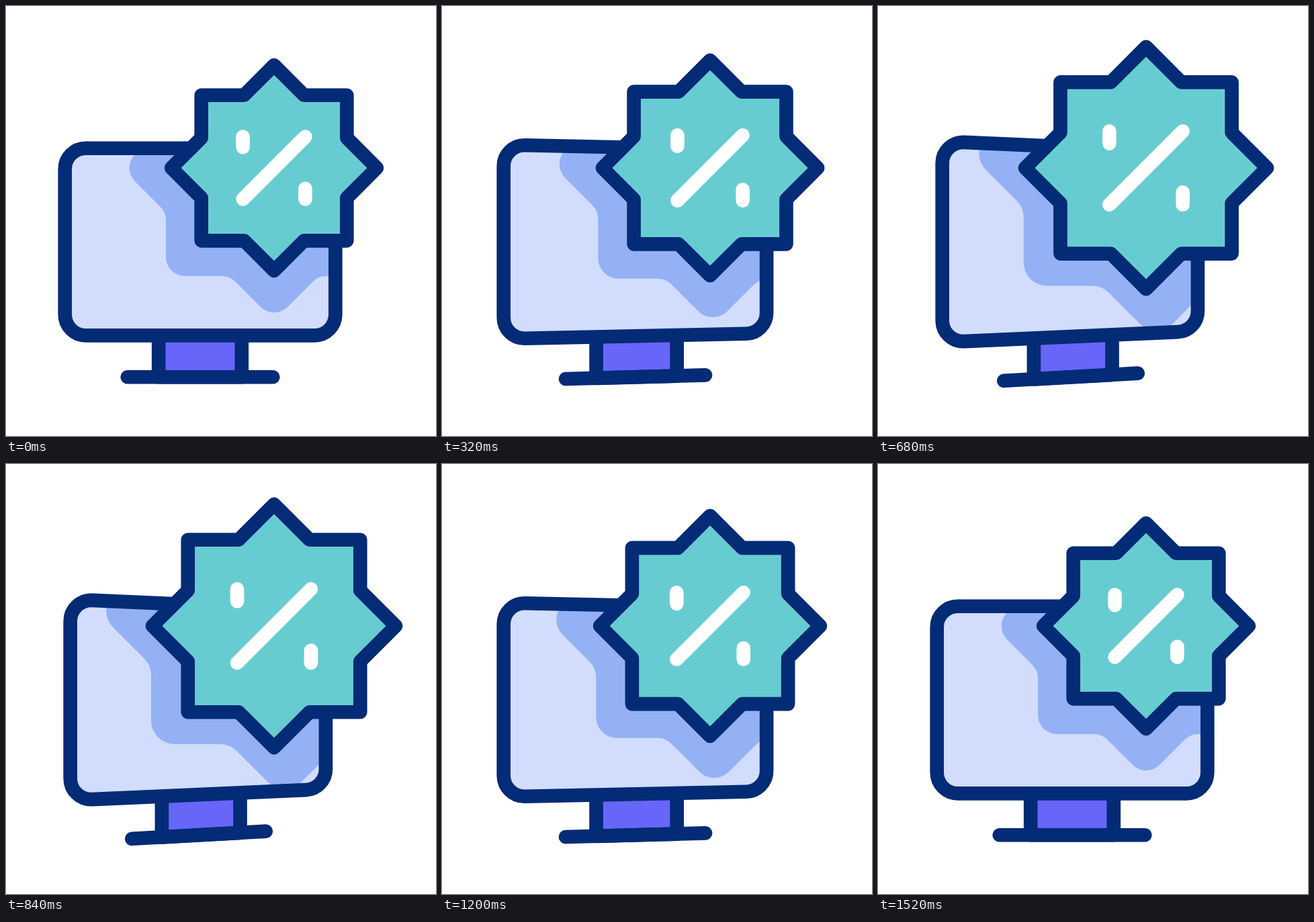
An HTML page with a canvas for the animation above (1.68 s loop, 640 by 640 pixels).

```html
<!DOCTYPE html>
<html lang="en">
<head>
<meta charset="utf-8">
<title>Discount on screen</title>
<style>
  html, body { margin: 0; width: 100%; height: 100%; overflow: hidden; background: #fff; }
  canvas { display: block; width: 640px; height: 640px; }
</style>
</head>
<body>
<canvas id="stage" width="640" height="640"></canvas>
<script>
const ctx = document.getElementById('stage').getContext('2d');
const LOOP = 1680, STEP = 40, LINE = 20.65;
const NAVY = '#042b76', SCREEN = '#d2dcfd', SHADOW = '#93b1f4', TEAL = '#67ccd1', PURPLE = '#6865f9';
const MID_X = 289, MID_Y = 351, FLOOR = 552.2;
const BADGE_X = 399, BADGE_Y = 241;

// cubic-bezier(.5, 0, .5, 1)
function ease(x) {
  if (x <= 0) return 0;
  if (x >= 1) return 1;
  let lo = 0, hi = 1;
  for (let i = 0; i < 24; i++) {
    const u = (lo + hi) / 2;
    if (1.5 * u * (1 - u) + u ** 3 < x) lo = u; else hi = u;
  }
  return lo * lo * (3 - 2 * lo);
}

// Rises from 0 to 1 between a and b, falls back between c and d
const pulse = (t, a, b, c, d) => ease((t - a) / (b - a)) - ease((t - c) / (d - c));

function polyline(points) {
  ctx.beginPath();
  for (const [x, y] of points) ctx.lineTo(x, y);
}

function rounded(points, radius) {
  const last = points[points.length - 1], first = points[0];
  ctx.beginPath();
  ctx.moveTo((last[0] + first[0]) / 2, (last[1] + first[1]) / 2);
  points.forEach(([x, y], i) => ctx.arcTo(x, y, ...points[(i + 1) % points.length], radius));
  ctx.closePath();
}

// Eight-pointed star: tips at distance tip, square corners at distance side
function star(tip, side) {
  const notch = tip - side, points = [];
  let quarter = [[0, -tip], [notch, -side], [side, -side], [side, -notch]];
  for (let i = 0; i < 4; i++) {
    points.push(...quarter);
    quarter = quarter.map(([x, y]) => [-y, x]);
  }
  return points;
}

function fill(color) { ctx.fillStyle = color; ctx.fill(); }

function stroke(color, width = LINE) {
  ctx.strokeStyle = color;
  ctx.lineWidth = width;
  ctx.stroke();
}

function zoomAt(x, y, scale) {
  ctx.translate(x, y);
  ctx.scale(scale, scale);
  ctx.translate(-x, -y);
}

// In the poses below, side is -1 for left and 1 for right; turning brings the left side nearer
function drawStand(turn) {
  const leg = side => MID_X + 1.2 * turn + side * (61.8 - 3.5 * turn);
  const foot = side => [leg(side), FLOOR - 3.25 * side * turn];
  const end = side => [
    MID_X - 2 * turn + side * (108.3 - 8.5 * turn),
    FLOOR - 5.6 * side * turn
  ];
  polyline([[leg(-1), 491], foot(-1), foot(1), [leg(1), 491]]);
  fill(PURPLE);
  stroke(NAVY);
  polyline([end(-1), end(1)]);
  stroke(NAVY);
}

function drawScreen(turn, grow) {
  const corner = (side, level) => [
    MID_X - 3.2 * turn + side * (201.3 - 11.2 * turn),
    MID_Y + level * (139.3 + turn * (1.9 - 8.35 * side))
  ];
  const corners = [corner(-1, -1), corner(1, -1), corner(1, 1), corner(-1, 1)];
  rounded(corners, 31);
  fill(SCREEN);
  ctx.save();
  ctx.clip();
  zoomAt(332, 338, 1 + 0.235 * grow);
  ctx.translate(BADGE_X, BADGE_Y);
  rounded(star(227, 161), 28.5);
  fill(SHADOW);
  ctx.restore();
  rounded(corners, 31);
  stroke(NAVY);
}

function drawBadge(grow) {
  const scale = 1 + 0.185 * grow, far = 46.4 * scale, near = 30.9 * scale;
  ctx.save();
  ctx.translate(BADGE_X, BADGE_Y);
  polyline(star(152.9 * scale, 108.3 * scale));
  ctx.closePath();
  fill(TEAL);
  stroke(NAVY);
  polyline([[-far, far], [far, -far]]);
  stroke('#fff');
  for (const side of [-1, 1]) {
    polyline([[side * far, side * far], [side * far, side * near]]);
    stroke('#fff');
  }
  ctx.restore();
}

const start = performance.now();

function draw() {
  const elapsed = (performance.now() - start) % LOOP;
  const t = Math.floor(elapsed / STEP) * STEP;
  const grow = pulse(t, 40, 800, 800, 1520);
  const turn = pulse(t, 120, 520, 1000, 1400);
  ctx.fillStyle = '#fff';
  ctx.fillRect(0, 0, 640, 640);
  ctx.lineCap = ctx.lineJoin = 'round';
  drawStand(turn);
  drawScreen(turn, grow);
  drawBadge(grow);
  requestAnimationFrame(draw);
}

draw();
</script>
</body>
</html>
```
